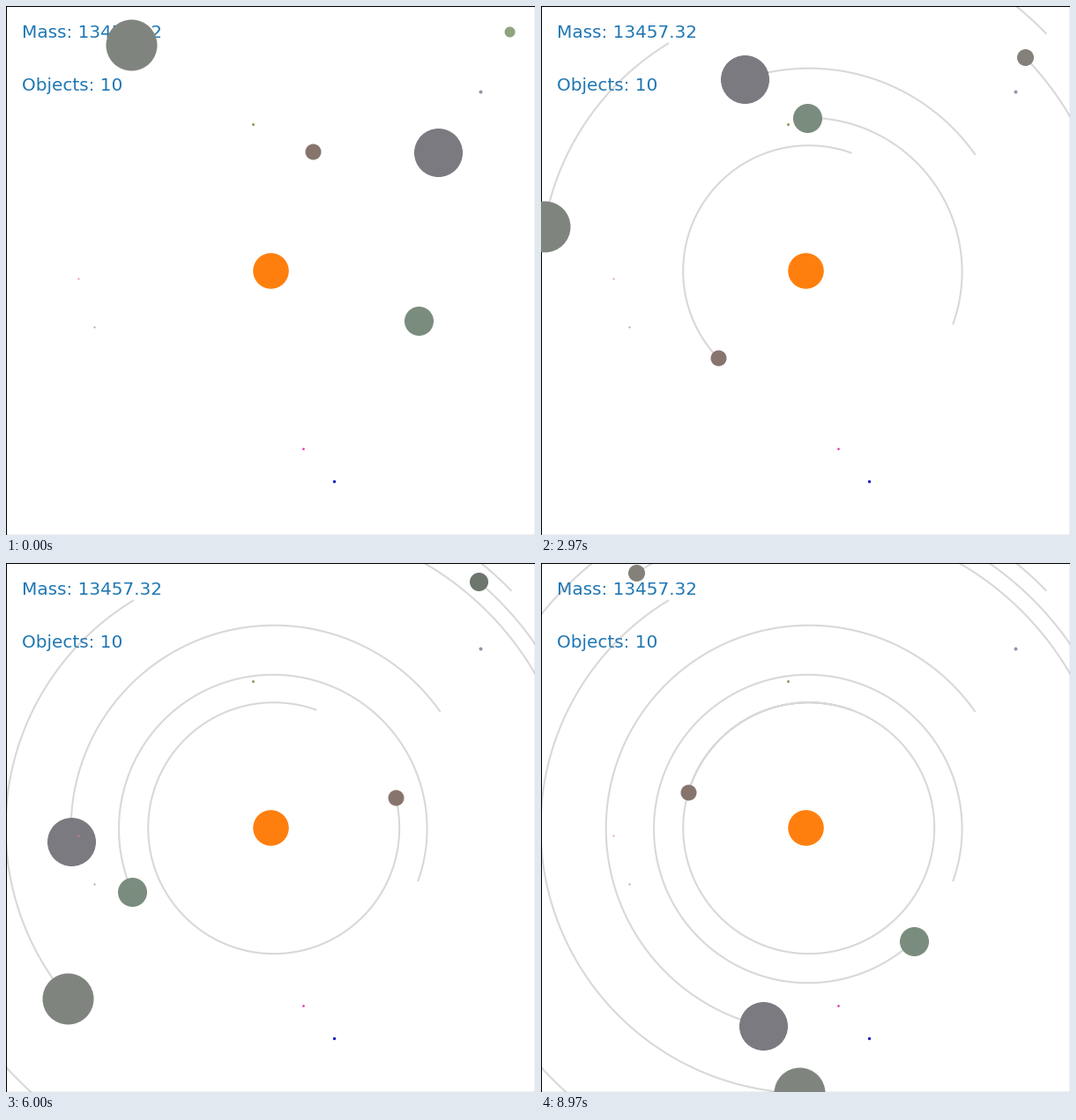
These frames come from a looping animation (600 by 600 pixels, 9 s). A matplotlib script:

```python
import numpy as np
import matplotlib.pyplot as plt
from matplotlib.animation import FuncAnimation

SIZE, DPI = 600, 100
FRAMES, INTERVAL = 300, 30
SUN = (300, 300)
PULL = 2561  # degrees per frame at unit radius, Kepler's third law

# centre x, centre y, radius, mean angle at start (degrees), diameter, colour
PLANETS = [
    (303.7, 300.7, 142.5, 73.43, 18, "#87756d"),
    (302.8, 301.5, 174.8, -18.40, 33, "#7a8c7e"),
    (304.0, 301.0, 230.3, 36.77, 55, "#7a7a80"),
    (300.8, 300.0, 301.3, 121.95, 58, "#80847f"),
    (300.5, 300.0, 346.7, 5.10, 19, "#84817a"),
    (300.0, 300.0, 365.2, -23.60, 21, "#6d766d"),
    (298.5, 297.0, 382.0, 44.00, 12, "#90a47e"),
    (300.0, 300.0, 404.8, 181.17, 6, "#a8bfb8"),
    (300.0, 300.0, 426.0, 196.20, 4, "#e8a0b0"),
]

# x, y, diameter, colour
DUST = [
    (538, 97, 4, "#9595a8"),
    (280, 134, 3, "#8f9a55"),
    (82, 309, 2, "#e77fa5"),
    (100, 364, 2, "#6f9f9a"),
    (337, 502, 2.6, "#e030b0"),
    (372, 539, 3.4, "#2020c8"),
]


def orbit(cx, cy, radius, start):
    """Slightly eccentric orbit with the sun in one focus."""
    t = np.arange(-1, FRAMES)
    mean = np.radians(start + PULL / radius**1.5 * t)
    ecc = np.hypot(cx - SUN[0], cy - SUN[1]) / radius
    peri = np.arctan2(cy - SUN[1], SUN[0] - cx)
    angle = mean + ecc * np.sin(mean - peri)
    return cx + radius * np.cos(angle), cy - radius * np.sin(angle)


def disc(x, y, diameter, color, z):
    size = max(diameter * 72 / DPI - 1, 0.3)
    return ax.plot([x], [y], "o", ms=size, color=color, zorder=z)[0]


fig = plt.figure(figsize=(SIZE / DPI, SIZE / DPI), dpi=DPI)
ax = fig.add_axes([0, 0, 1, 1])
ax.set(xlim=(0, SIZE), ylim=(SIZE, 0), xticks=[], yticks=[])

for y, label in ((36, "Mass: 13457.32"), (96, "Objects: 10")):
    ax.text(18, y, label, color="C0", fontsize=14.4, family="DejaVu Sans", zorder=1.5)

disc(*SUN, 40.5, "C1", 3)
for x, y, d, color in DUST:
    disc(x, y, d, color, 5)

paths, trails, bodies = [], [], []
for cx, cy, radius, start, d, color in PLANETS:
    x, y = orbit(cx, cy, radius, start)
    paths.append((x, y))
    trails.append(ax.plot([], [], color="gray", alpha=0.3, lw=1.5, zorder=2)[0])
    bodies.append(disc(x[1], y[1], d, color, 4))


def update(frame):
    now = frame + 1
    for (x, y), trail, body in zip(paths, trails, bodies):
        trail.set_data(x[:now + 1], y[:now + 1])
        body.set_data([x[now]], [y[now]])
    return trails + bodies


anim = FuncAnimation(fig, update, frames=FRAMES, interval=INTERVAL,
                     init_func=lambda: update(0), repeat=True, repeat_delay=0)
plt.show()
```
